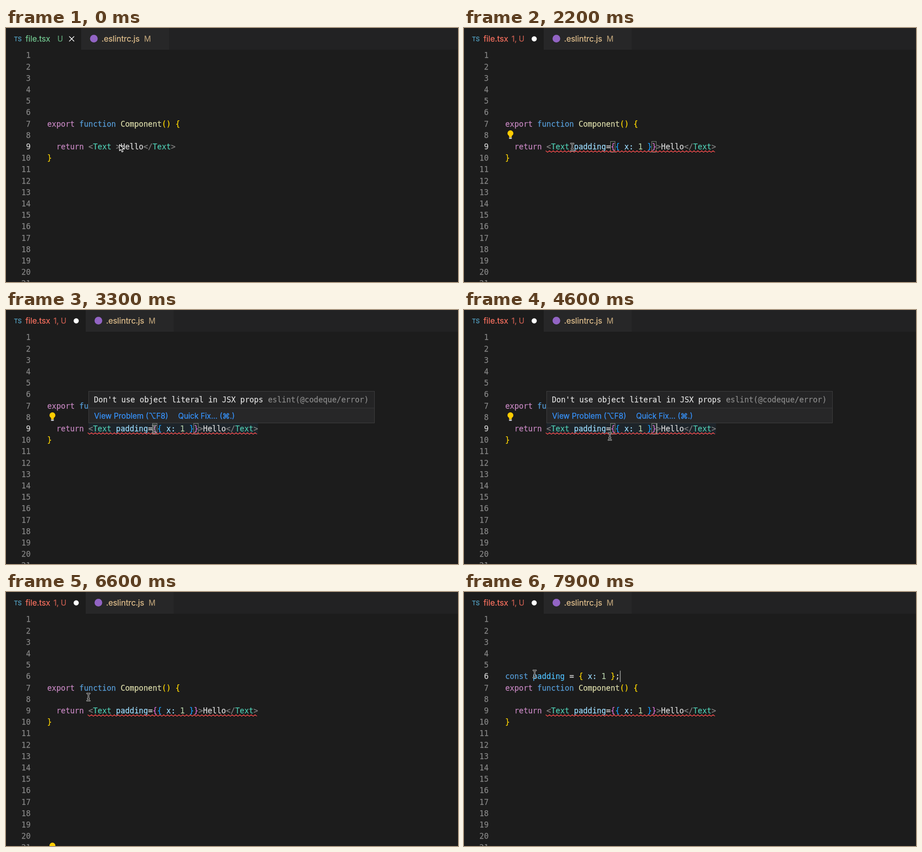
An HTML page with a canvas for the animation above (8000 ms loop, 998 by 561 pixels).

```html
<!DOCTYPE html>
<html lang="en">
<head>
<meta charset="utf-8">
<title>Editor</title>
<style>
html, body { margin: 0; width: 100%; height: 100%; overflow: hidden; background: #1c1c1c; }
canvas { display: block; width: 998px; height: 561px; }
</style>
</head>
<body>
<canvas id="stage" width="998" height="561"></canvas>
<script>
const ctx = document.getElementById('stage').getContext('2d');
const W = 998, H = 561, LOOP = 8000;
const MONO = '16.8px "DejaVu Sans Mono", monospace';
const UI = '"Inter", "DejaVu Sans", sans-serif';
const PITCH = 10.12, LEFT = 91, STEP = 25.2;

// Moments of the hard changes, in ms
const INSERT = 1100, LINT = 1500, HOVER_ON = 3100, HOVER_OFF = 4700;
const CLICK_LOW = 5900, CLICK_SIX = 7000, PASTE = 7400;

const C = {
  bg: '#1c1c1c', bar: '#222223', tab: '#272728',
  key: '#c586c0', blue: '#569cd6', fn: '#dcdcaa', gold: '#ffd700',
  tag: '#808080', type: '#4ec9b0', text: '#dadada', attr: '#9cdcfe',
  orchid: '#da70d6', brace: '#179fff', num: '#b5cea8', name: '#4fc1ff',
  gutter: '#858585', active: '#d0d0d0', red: '#f14c4c',
  ok: '#73c991', error: '#f8705f', changed: '#e2c08d', link: '#3794ff'
};

const HEAD = [['export', C.key], [' function', C.blue], [' Component', C.fn], ['() {', C.gold]];
const OPEN = [['  return', C.key], [' <', C.tag], ['Text ', C.type]];
const PROP = [['padding', C.attr], ['=', C.text], ['{', C.orchid], ['{', C.brace], [' x:', C.attr],
  [' 1', C.num], [' }', C.brace], ['}', C.orchid]];
const CLOSE = [['>', C.tag], ['Hello', C.text], ['</', C.tag], ['Text', C.type], ['>', C.tag]];
const CONST = [['const', C.blue], [' padding', C.name], [' =', C.text], [' {', C.gold], [' x:', C.attr],
  [' 1', C.num], [' }', C.gold], [';', C.text]];

// Pointer stops: time, x, y
const PATH = [[0, 250, 257], [100, 250, 257], [600, 239, 263], [2300, 239, 263], [2900, 327, 263],
  [4200, 327, 263], [4600, 322, 279], [4900, 300, 473], [5500, 300, 473], [5800, 250, 585],
  [6000, 250, 585], [6600, 182, 232], [7000, 156, 181], [LOOP, 156, 181]];

const lineY = n => 60.3 + STEP * (n - 1);
const colX = i => LEFT + PITCH * i;

// The thin outline gives the text its slightly heavier, smoothed look
function label(str, x, y, color, font, spacing = 0) {
  ctx.font = font;
  ctx.fillStyle = ctx.strokeStyle = color;
  ctx.lineWidth = 0.25;
  ctx.letterSpacing = spacing + 'px';
  ctx.fillText(str, x, y);
  ctx.strokeText(str, x, y);
}

function ui(str, x, y, color, size = 17.8, weight = 400, spacing = -0.1) {
  label(str, x, y, color, `${weight} ${size}px ${UI}`, spacing);
}

function code(parts, n) {
  let i = 0;
  for (const [str, color] of parts) {
    label(str, colX(i), lineY(n) + 6.1, color, MONO);
    i += str.length;
  }
}

function box(x, y, w, h, color) {
  ctx.fillStyle = color;
  ctx.fillRect(x, y, w, h);
}

function disc(x, y, r, color) {
  ctx.fillStyle = color;
  ctx.beginPath();
  ctx.arc(x, y, r, 0, Math.PI * 2);
  ctx.fill();
}

function stroke(path, color, width) {
  ctx.strokeStyle = color;
  ctx.lineWidth = width;
  ctx.stroke(path);
}

function tabs(t) {
  const bad = t >= LINT, dx = bad ? 10 : 0, tint = bad ? C.error : C.ok;
  box(0, 0, W, 48, C.bar);
  box(0, 0, 166 + dx, 48, C.bg);
  box(166 + dx, 0, 194, 48, C.tab);
  ui('TS', 17.5, 28.5, '#519aba', 13.5, 500, -0.2);
  ui('file.tsx', 43, 30, tint);
  ctx.globalAlpha = 0.75;
  if (bad) ui('1, U', 105, 29.5, tint, 16.6);
  else ui('U', 113.5, 29.5, tint, 16.6);
  ui('M', 305 + dx, 29.5, C.changed, 16.6);
  ctx.globalAlpha = 1;
  ui('.eslintrc.js', 211 + dx, 30, C.changed);
  disc(194 + dx, 23.5, 8.5, '#9264c4');
  if (t >= INSERT) disc(145 + dx, 24, 5.7, '#ffffff');
  else stroke(new Path2D('M139.5 18.5L150.5 29.5M150.5 18.5L139.5 29.5'), '#ffffff', 1.5);
}

function gutter(t) {
  const active = t < CLICK_LOW ? 9 : t < CLICK_SIX ? 22 : 6;
  ctx.textAlign = 'right';
  for (let n = 1; n <= 21; n++) {
    label(n, 54.3, lineY(n) + 6.1, n === active ? C.active : C.gutter, MONO);
  }
  ctx.textAlign = 'left';
}

function squiggle(x0, x1, y) {
  const wave = new Path2D();
  for (let x = x0 - 1.75, up = 1; x <= x1; x += 4.2, up ^= 1) wave.lineTo(x, y + (up ? -1.6 : 1.6));
  stroke(wave, C.red, 1.4);
}

function bulb(n) {
  const y = lineY(n) - 4.2;
  disc(102.5, y, 6.5, '#fc0');
  box(99.5, y + 4, 6, 5, '#fc0');
  box(99.5, y + 9.4, 6, 3, '#c9c9c9');
}

function bracket(i) {
  const x = colX(i), y = lineY(9) - 12;
  box(x, y, PITCH, 24, 'rgba(0,100,0,.1)');
  ctx.strokeStyle = '#888';
  ctx.lineWidth = 1;
  ctx.strokeRect(Math.round(x) - 0.5, Math.round(y) + 0.5, 10, 24);
}

function caret(t) {
  if (t < 600 || (t + 400) % 1000 > 510) return;
  let col = 15, n = 9;
  if (t >= CLICK_SIX) { n = 6; col = t < PASTE ? 0 : 25; }
  else if (t >= CLICK_LOW) n = 22;
  else if (t >= INSERT) col = 33;
  box(colX(col) + 0.3, lineY(n) - 12.6, 1.4, 25.2, '#aeafad');
}

function popup() {
  box(182, 179, 632, 71, '#404041');
  box(183, 180, 630, 69, '#242425');
  box(183, 217, 630, 32, '#272728');
  box(183, 216, 630, 1, '#38383a');
  label("Don't use object literal in JSX props", 194, 203.7, '#dedede', MONO);
  label('eslint(@codeque/error)', 578.5, 203.7, '#8a8a8a', MONO);
  ui('View Problem (⌥F8)', 194.5, 239.8, C.link, 16.8, 400, 0);
  ui('Quick Fix... (⌘.)', 380, 239.8, C.link, 16.6, 400, 0);
}

function pointer(t) {
  const k = PATH.findIndex(p => p[0] > t);
  const [t0, x0, y0] = PATH[k - 1], [t1, x1, y1] = PATH[k];
  const u = (t - t0) / (t1 - t0), e = u * u * (3 - 2 * u);
  ctx.save();
  ctx.translate(x0 + (x1 - x0) * e, y0 + (y1 - y0) * e);
  ctx.lineJoin = ctx.lineCap = 'round';
  if (t < 300) {
    const arrow = new Path2D('M0.5 0.5V14.2L3.6 11.3L6 16.8L8.6 15.7L6.2 10.3H10.4Z');
    ctx.fillStyle = '#111';
    ctx.fill(arrow);
    stroke(arrow, '#f2f2f2', 1.3);
  } else {
    const beam = new Path2D('M-3 -8Q0 -8 0 -5.5V5.5Q0 8 -3 8M3 -8Q0 -8 0 -5.5M0 5.5Q0 8 3 8M-1.5 3H1.5');
    stroke(beam, '#e8e8e8', 3);
    stroke(beam, '#111', 1.3);
  }
  ctx.restore();
}

function draw(t) {
  const linted = t >= INSERT, onNine = t < CLICK_LOW, hover = t >= HOVER_ON && t < HOVER_OFF;
  box(0, 0, W, H, C.bg);
  tabs(t);
  gutter(t);
  if (hover) box(colX(9), lineY(9) - 12.6, PITCH * 37, 25.2, 'rgba(38,79,120,.15)');
  if (linted && onNine) [23, 32].forEach(bracket);
  if (t >= PASTE) code(CONST, 6);
  code(HEAD, 7);
  code(linted ? [...OPEN, ...PROP, ...CLOSE] : [...OPEN, ...CLOSE], 9);
  code([['}', C.gold]], 10);
  if (linted) squiggle(colX(9), colX(46), 272.7);
  if (t >= LINT && onNine) bulb(8);
  if (t >= 6200 && t < CLICK_SIX) bulb(21);
  caret(t);
  if (hover) popup();
  pointer(t);
}

const start = performance.now();
function frame() {
  draw((performance.now() - start) % LOOP);
  requestAnimationFrame(frame);
}
frame();
</script>
</body>
</html>
```
